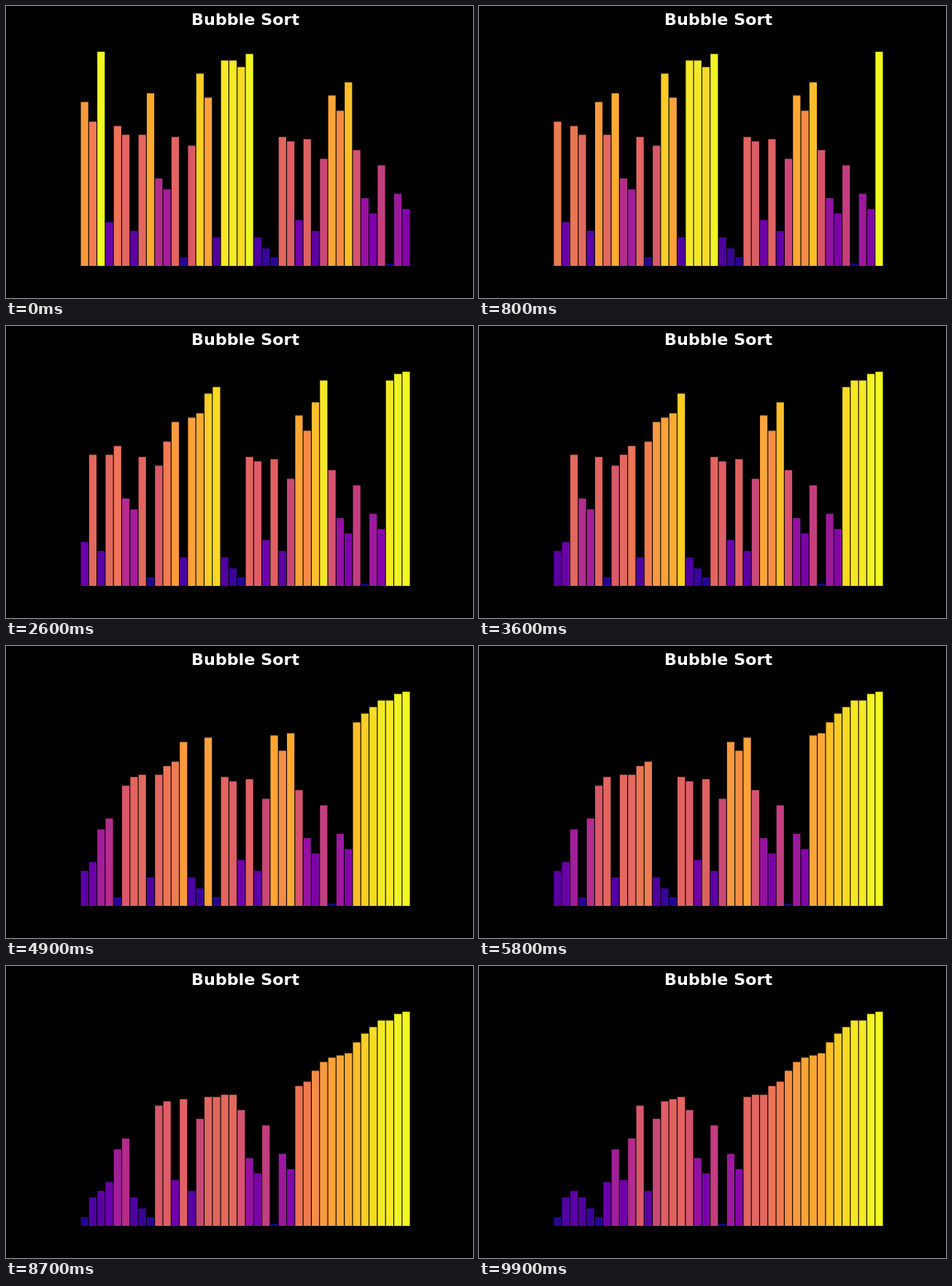
Recreate the animation shown at these times as a matplotlib script. Size 640 by 400 pixels, loop 10000 ms.

```python
import matplotlib.pyplot as plt
from matplotlib.animation import FuncAnimation

FRAMES = 100
INTERVAL = 100          # ms
STEPS_PER_FRAME = 5.597

# The unsorted input
VALUES = [75, 66, 98, 20, 64, 60, 16, 60, 79, 40,
          35, 59, 4, 55, 88, 77, 13, 94, 94, 91,
          97, 13, 8, 4, 59, 57, 21, 58, 16, 49,
          78, 71, 84, 53, 31, 24, 46, 1, 33, 26]


def bubble_steps(values):
    """Yield the list at the start, after each comparison and after each pass."""
    a = list(values)
    yield a[:]
    for end in range(len(a) - 1, 0, -1):
        for j in range(end):
            if a[j] > a[j + 1]:
                a[j], a[j + 1] = a[j + 1], a[j]
            yield a[:]
        yield a[:]


steps = list(bubble_steps(VALUES))
top = max(VALUES)

plt.rcParams["font.family"] = "DejaVu Sans"
fig, ax = plt.subplots(figsize=(6.4, 4), dpi=100, facecolor="black")
bars = ax.bar(range(len(VALUES)), VALUES, width=0.9, linewidth=0, snap=False)
ax.set_ylim(0, top * 1.05)
ax.set_title("Bubble Sort", color="white", fontsize=16,
             fontweight="bold", pad=15.84)
ax.axis("off")


def update(frame):
    for bar, v in zip(bars, steps[round(frame * STEPS_PER_FRAME)]):
        bar.set_height(v)
        bar.set_facecolor(plt.cm.plasma(v / top))
    return bars


anim = FuncAnimation(fig, update, frames=FRAMES, interval=INTERVAL,
                     init_func=lambda: update(0), repeat=True, repeat_delay=0)
plt.show()
```
